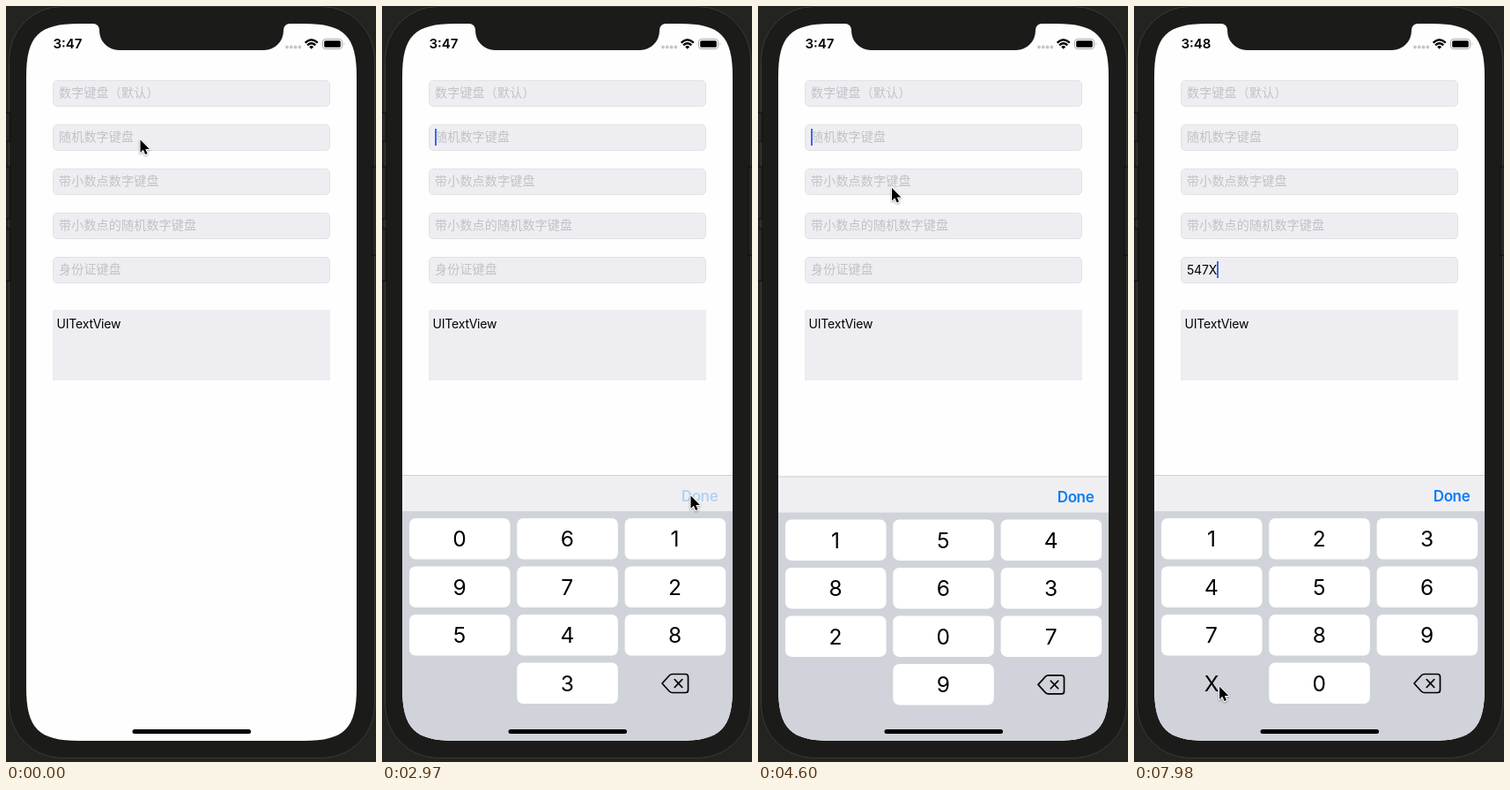
Recreate the animation shown at these times as an HTML page. Size 420 by 856 pixels, loop 8 s.

```html
<!DOCTYPE html>
<html lang="zh-CN">
<head>
<meta charset="utf-8">
<title>Keyboard demo</title>
<style>
  html, body { margin: 0; width: 100%; height: 100%; overflow: hidden; background: #23241f; }
  svg { display: block; width: 420px; height: 856px; }
  text { font-family: Inter, "Noto Sans CJK SC", "Noto Sans CJK", sans-serif; }
  .bezel { fill: #1b1b1a; }
  .side { fill: #272726; stroke: #0c0c0c; }
  .clock { font-size: 15px; font-weight: 600; }
  .field { fill: #eeedf2; stroke: #e2e1e6; }
  .hint { font-size: 14px; letter-spacing: .2px; fill: #c2c2c6; }
  .body { font-size: 14px; letter-spacing: -.2px; }
  .done { font-size: 17px; font-weight: 600; letter-spacing: -.4px; fill: #0a7cf5; }
  .key { fill: #fff; }
  .key.down { fill: #bfc2ca; }
  .glyph { font-size: 24.5px; text-anchor: middle; }
  .line { fill: none; stroke: #000; stroke-width: 1.7; stroke-linecap: round; stroke-linejoin: round; }
  .arrow { stroke: #fff; stroke-width: 2; stroke-linejoin: round; paint-order: stroke;
           filter: drop-shadow(0 1px 1px rgba(0, 0, 0, .35)); }
</style>
</head>
<body>
<svg viewBox="0 0 420 856">
  <defs>
    <clipPath id="screen">
      <path d="M23 80C23 34 37 20 83 20H338C384 20 398 34 398 80V772C398 818 384 832 338 832H83C37 832 23 818 23 772Z"/>
    </clipPath>
  </defs>

  <rect class="bezel" x="3.5" y="0.5" width="415" height="851" rx="60" stroke="#3a3a38"/>
  <g class="side">
    <rect x="-2" y="121" width="7" height="32"/>
    <rect x="-2" y="182" width="7" height="59"/>
    <rect x="-2" y="252" width="7" height="59"/>
    <rect x="416" y="182" width="7" height="100"/>
  </g>

  <g clip-path="url(#screen)">
    <rect x="23" y="20" width="375" height="812" fill="#fefefe"/>
    <path class="bezel" d="M99 19V20A7 7 0 0 1 106 27V28A22 22 0 0 0 128 50H293A22 22 0 0 0 315 28V27A7 7 0 0 1 322 20V19Z"/>

    <text class="clock" id="clock" x="53.5" y="48.3"></text>
    <path d="M319 46.5H334" stroke="#c6c6c8" stroke-width="3.8" stroke-linecap="round" stroke-dasharray="0 4.8"/>
    <g fill="none" stroke="#000" stroke-width="2.3">
      <path d="M339.6 41.6Q346.7 35 353.8 41.6"/>
      <path d="M342.1 44.4Q346.7 40.2 351.3 44.4"/>
    </g>
    <path d="M344.2 46.2Q346.7 44 349.2 46.2L346.7 48.7Z"/>
    <rect x="359.5" y="37.5" width="22" height="11" rx="3" fill="none" stroke="#a5a5a7"/>
    <rect x="361.2" y="39.2" width="18.6" height="7.6" rx="1.6"/>
    <path d="M383 41.2Q384.6 43 383 44.8Z" fill="#a5a5a7"/>

    <g id="fields"></g>
    <rect x="53" y="344" width="315" height="80" fill="#eeedf2"/>
    <text class="body" x="57.5" y="365.3">UITextView</text>
    <text class="body" id="typed" x="60" y="303.5"></text>
    <rect id="caret" width="2" height="19" fill="#4069e6"/>

    <g id="board">
      <rect x="23" y="531" width="375" height="41" fill="#efeff2"/>
      <rect x="23" y="531" width="375" height="1" fill="#d0d0d4"/>
      <rect x="23" y="572" width="375" height="262" fill="#d1d3da"/>
      <text class="done" id="done" x="339.8" y="561">Done</text>
      <g id="keys"></g>
      <path class="line" d="M318 767L326.2 758Q327.6 756.5 329.6 756.5H344.5Q347.5 756.5 347.5 759.5V774.5Q347.5 777.5 344.5 777.5H329.6Q327.6 777.5 326.2 776Z"/>
      <path class="line" d="M332.3 762.7L340.7 771.3M340.7 762.7L332.3 771.3"/>
    </g>
    <rect x="143.5" y="819" width="134.5" height="5" rx="2.5"/>
  </g>

  <path class="arrow" id="arrow" d="M.5 .5V14.9L3.8 11.8L6.1 17.1L8.5 16.1L6.3 10.9H10.9Z"/>
</svg>

<script>
// Time advances in ticks, like a screen recorder at about 7 frames a second.
const LOOP = 8000, LEAD = 450, TICK = 147.5;
const BOARD_HEIGHT = 303, CLOSE = 17, REOPEN = 25;
const ENTRY = '547X';

const scenes = [
  { at: 8, field: 1, chars: '061972548 3' },
  { at: REOPEN, field: 1, chars: '154863207 9' },
  { at: 29, field: 2, chars: '123456789.0' },
  { at: 35, field: 3, chars: '379682410.5' },
  { at: 39, field: 4, chars: '123456789X0' }
];

// Where the pointer has come to rest: tick, x, y.
const stops = [
  [-2, 152, 151], [1.5, 138, 148], [10, 152.5, 166], [15, 350, 554], [18, 350, 554],
  [21, 138.5, 169], [23, 138, 150], [28, 151.5, 205.5], [34, 152, 246], [38, 153.5, 294],
  [43, 200, 655], [45, 98, 662], [47, 98, 712], [50, 96.5, 770]
];

const $ = id => document.getElementById(id);
const clamp = (v, lo, hi) => Math.min(hi, Math.max(lo, v));
const smooth = f => f * f * (3 - 2 * f);

// Share of the way still to go, n ticks into a critically damped spring.
function spring(n) {
  const x = 2.5 * Math.max(0, n);
  return (1 + x) * Math.exp(-x);
}

function add(parent, tag, attrs, text = '') {
  const el = document.createElementNS('http://www.w3.org/2000/svg', tag);
  for (const name in attrs) el.setAttribute(name, attrs[name]);
  el.textContent = text;
  return parent.appendChild(el);
}

const hints = ['数字键盘（默认）', '随机数字键盘', '带小数点数字键盘', '带小数点的随机数字键盘', '身份证键盘']
  .map((label, i) => {
    const y = 84 + 50 * i;
    add($('fields'), 'rect', { class: 'field', x: 53.5, y: y + .5, width: 314, height: 29, rx: 4.5 });
    return add($('fields'), 'text', { class: 'hint', x: 60, y: y + 19.3 }, label);
  });

const keys = Array.from({ length: 11 }, (_, i) => {
  const x = 31 + 122.3 * (i % 3), y = 580 + 54.5 * Math.floor(i / 3);
  // The lower left key has no cap.
  const cap = i === 9 ? null : add($('keys'), 'rect', { class: 'key', x, y, width: 114.5, height: 46.5, rx: 7 });
  return { cap, glyph: add($('keys'), 'text', { class: 'glyph', x: x + 57, y: y + 32.4 }) };
});

function hidden(k) {
  if (k >= REOPEN) return spring(k - REOPEN);
  return k >= CLOSE ? 1 - spring(k - CLOSE) : spring(k - scenes[0].at);
}

// Longer ways take longer, and every stop lasts at least a tick.
function pointer(k) {
  const i = stops.findIndex(([at]) => at >= k);
  if (i < 0) return stops.at(-1).slice(1);
  const [t0, x0, y0] = stops[i - 1], [t1, x1, y1] = stops[i];
  const span = Math.min(t1 - t0 - 1, 2 + Math.hypot(x1 - x0, y1 - y0) / 150);
  const f = smooth(clamp(1 - (t1 - k) / span, 0, 1));
  return [x0 + (x1 - x0) * f, y0 + (y1 - y0) * f];
}

function draw(k) {
  const { at, field, chars } = scenes.findLast(s => s.at <= k) || scenes[0];
  const focused = k >= at && (k <= CLOSE || k >= REOPEN);
  // A key goes down on odd ticks and types on even ones.
  const count = clamp(Math.floor((k - 42) / 2), 0, ENTRY.length);
  const down = k > 44 && k % 2 ? ENTRY[count] : null;

  $('clock').textContent = k < 43 ? '3:47' : '3:48';
  $('typed').textContent = ENTRY.slice(0, count);
  hints[4].style.display = count ? 'none' : '';
  $('caret').style.display = focused ? '' : 'none';
  $('caret').setAttribute('x', 60 + 8.5 * count);
  $('caret').setAttribute('y', 89 + 50 * field);
  $('board').setAttribute('transform', `translate(0 ${BOARD_HEIGHT * hidden(k)})`);
  $('done').setAttribute('opacity', k === CLOSE - 1 || k === CLOSE ? .25 : 1);
  keys.forEach(({ cap, glyph }, i) => {
    glyph.textContent = chars[i];
    if (cap) cap.classList.toggle('down', chars[i] === down);
  });
  $('arrow').setAttribute('transform', `translate(${pointer(k)})`);
}

const start = performance.now();
let last;
function frame() {
  const t = (performance.now() - start) % LOOP;
  const k = Math.max(-1, Math.floor((t - LEAD) / TICK));
  if (k !== last) draw(last = k);
  requestAnimationFrame(frame);
}
frame();
</script>
</body>
</html>
```
